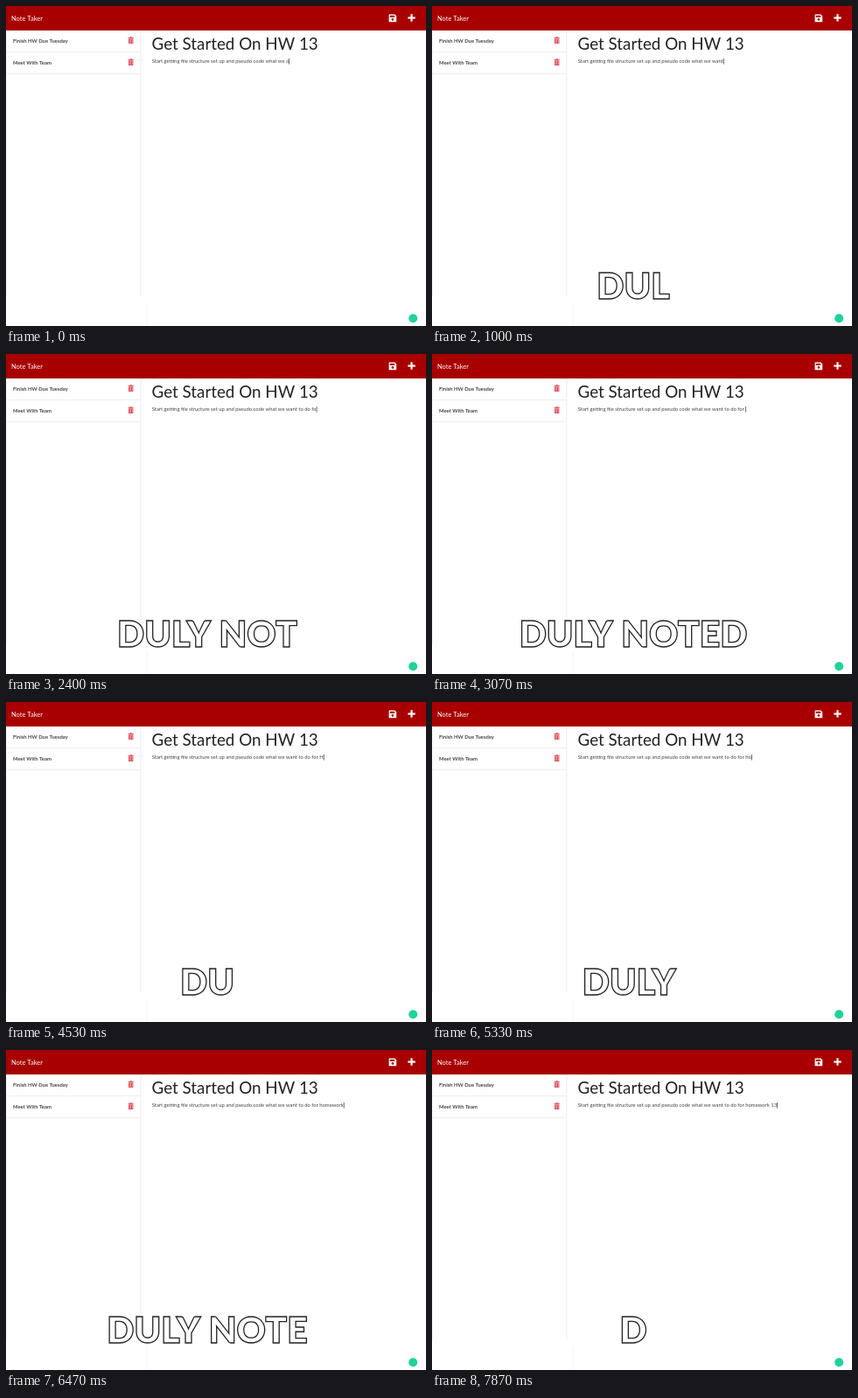
Write an HTML page with a canvas that moves like this. It is 480x366 px and loops after 8 s.

```html
<!DOCTYPE html>
<html lang="en">
<head>
<meta charset="utf-8">
<title>Note Taker</title>
<style>
  html, body { margin: 0; height: 100%; overflow: hidden; background: #fff; }
  canvas { display: block; width: 480px; height: 366px; }
</style>
</head>
<body>
<canvas id="stage" width="480" height="366"></canvas>
<script>
const ctx = document.getElementById('stage').getContext('2d');
const LOOP = 8000;

// Typing bursts: start time, delay per key, keys ("<" is backspace)
const OPENING = 'Start getting file structure set up and pseudo code what we a';
const BURSTS = [
  [300, 0, '<'],
  [500, 130, 'want to do'],
  [2000, 150, ' for '],
  [4200, 0, 'H'],
  [4700, 0, '<'],
  [4950, 250, 'ho'],
  [5450, 140, 'mework'],
  [6900, 250, ' 13']
];

const CAPTION = {
  text: 'DULY NOTED', start: 400, period: 3700, step: 266, hideAt: 3200,
  x: 230, y: 335.3
};

function rect(x, y, w, h, color) {
  ctx.fillStyle = color;
  ctx.fillRect(x, y, w, h);
}

function text(str, x, y, font, color) {
  ctx.font = font;
  ctx.fillStyle = color;
  ctx.fillText(str, x, y);
}

function trashIcon(x, y) {
  const red = '#e0525f';
  rect(x, y + 0.9, 6.4, 0.9, red);
  rect(x + 2, y, 2.4, 1, red);
  rect(x + 0.5, y + 2.2, 5.4, 5.6, red);
  for (let i = 0; i < 3; i++) rect(x + 1.5 + i * 1.5, y + 3.1, 0.5, 3.8, '#f3b4ba');
}

function saveIcon(x, y) {
  ctx.fillStyle = '#fff';
  ctx.beginPath();
  ctx.moveTo(x, y);
  ctx.lineTo(x + 6.6, y);
  ctx.lineTo(x + 8.6, y + 2);
  ctx.lineTo(x + 8.6, y + 8.6);
  ctx.lineTo(x, y + 8.6);
  ctx.fill();
  rect(x + 1.2, y + 1.2, 5.2, 2.2, '#a80000');
  ctx.beginPath();
  ctx.arc(x + 4.3, y + 5.8, 1.3, 0, Math.PI * 2);
  ctx.fill();
}

function drawHeader() {
  rect(0, 0, 480, 28, '#a80000');
  text('Note Taker', 6, 16.7, '7.5px Lato, sans-serif', '#fff');
  saveIcon(437.6, 9.6);
  rect(459.3, 12.5, 8.4, 2.1, '#fff');
  rect(462.45, 9.3, 2.1, 8.4, '#fff');
}

function drawSidebar() {
  const line = '#ededed';
  rect(0, 28, 0.8, 304, line);
  rect(153.4, 28, 0.9, 304, line);
  rect(160.7, 340, 0.8, 26, '#f3f3f3');
  ['Finish HW Due Tuesday', 'Meet With Team'].forEach((label, i) => {
    const y = i * 25;
    text(label, 8, 42.2 + y, 'bold 5.9px Lato, sans-serif', '#444');
    trashIcon(139.5, 35.2 + y);
    rect(0, 52 + y, 154, 0.9, line);
  });
}

function typedNote(t) {
  let note = OPENING;
  for (const [start, delay, keys] of BURSTS) {
    [...keys].forEach((key, i) => {
      if (t >= start + i * delay) note = key === '<' ? note.slice(0, -1) : note + key;
    });
  }
  return note;
}

function drawNote(t) {
  text('Get Started On HW 13', 166.6, 49.6, '18.8px Lato, sans-serif', '#222');
  const note = typedNote(t);
  text(note, 166.8, 65.4, '5.87px Lato, sans-serif', '#444');
  rect(166.9 + ctx.measureText(note).width, 60, 0.7, 6.6, '#333');
}

function drawCaption(t) {
  const { text: full, start, period, step, hideAt, x, y } = CAPTION;
  const phase = (t - start + period) % period;
  if (phase >= hideAt) return;
  const shown = full.slice(0, Math.floor(phase / step) + 1);

  ctx.font = '900 41px Lato, sans-serif';
  ctx.lineWidth = 1.3;
  ctx.miterLimit = 4;
  ctx.strokeStyle = '#222';
  ctx.fillStyle = '#fff';
  const left = x - ctx.measureText(shown).width / 2;
  ctx.fillText(shown, left, y);
  ctx.strokeText(shown, left, y);
}

function drawBadge() {
  ctx.fillStyle = '#1fd19b';
  ctx.beginPath();
  ctx.arc(465.2, 357.2, 5, 0, Math.PI * 2);
  ctx.fill();
}

function frame(now) {
  const t = now % LOOP;
  rect(0, 0, 480, 366, '#fff');
  drawHeader();
  drawSidebar();
  drawNote(t);
  drawBadge();
  drawCaption(t);
  requestAnimationFrame(frame);
}
requestAnimationFrame(frame);
</script>
</body>
</html>
```
